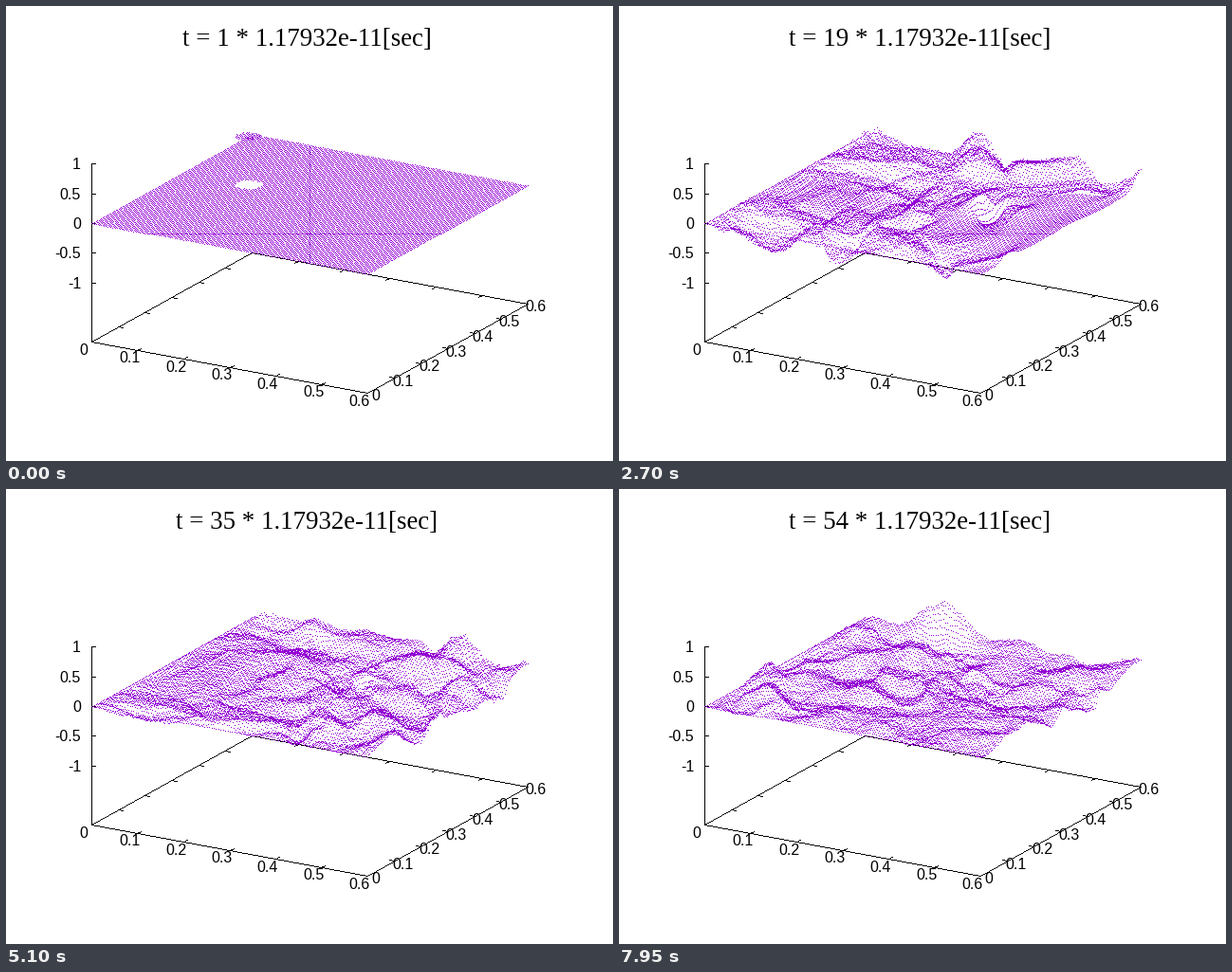
Write a matplotlib script that moves like this. It is 640 by 480 pixels and loops after 8 s.

```python
import numpy as np
import matplotlib.pyplot as plt
from matplotlib.animation import FuncAnimation

WIDTH, HEIGHT, DPI = 640, 480, 96
SNAPSHOTS, STEPS_PER_SNAPSHOT = 54, 8
CELLS = 120
COURANT_SQ = 0.499
DAMPING = 0.002
PERIOD, DRIVE_STEPS, AMPLITUDE = 36, 36, 0.81
PURPLE = (0x94 / 255, 0, 0xD3 / 255, 1)
BLACK = (0, 0, 0, 1)
PX_PER_Z = 62.5


def project(u, v, z=0.0):
    """Screen position of a point with u, v in 0..1 on the plate."""
    return 90 + 291 * u + 169 * v, 229 + 54 * u - 94 * v - PX_PER_Z * z


def floor_point(u, v):
    return project(u, v, -2)


def disc(ci, cj, radius):
    i, j = np.indices((CELLS + 1, CELLS + 1))
    return (i - ci) ** 2 + (j - cj) ** 2 <= radius ** 2


def simulate():
    """Wave equation: fixed walls at 0, free walls at the far sides,
    a short oscillating source and a slower round obstacle."""
    source = disc(28, 69, 5)
    gain = np.where(disc(72, 67, 18), COURANT_SQ / 4, COURANT_SQ)[1:, 1:]
    field = np.where(source, AMPLITUDE, 0.0)
    previous = field.copy()
    states = [field.copy()]
    for step in range(1, (SNAPSHOTS - 1) * STEPS_PER_SNAPSHOT + 1):
        p = np.pad(field, ((0, 1), (0, 1)), mode="edge")
        laplacian = (p[2:, 1:-1] + p[:-2, 1:-1] + p[1:-1, 2:]
                     + p[1:-1, :-2] - 4 * p[1:-1, 1:-1])
        following = field + (1 - DAMPING) * (field - previous)
        following[1:, 1:] += gain * laplacian
        if step < DRIVE_STEPS:
            following[source] = AMPLITUDE * np.cos(2 * np.pi * step / PERIOD)
        previous, field = field, following
        if step % STEPS_PER_SNAPSHOT == 0:
            states.append(field.copy())
    return states


def draw_line(image, start, end):
    (x0, y0), (x1, y1) = np.rint([start, end])
    count = int(max(abs(x1 - x0), abs(y1 - y0))) + 1
    cols = np.rint(np.linspace(x0, x1, count)).astype(int)
    rows = np.rint(np.linspace(y0, y1, count)).astype(int)
    image[rows, cols] = BLACK


def draw_tick(image, point, dx, dy):
    draw_line(image, point, (point[0] + dx, point[1] + dy))


def axes_image():
    image = np.ones((HEIGHT, WIDTH, 4))
    corners = [floor_point(*c) for c in ((0, 0), (1, 0), (1, 1), (0, 1), (0, 0))]
    for start, end in zip(corners, corners[1:]):
        draw_line(image, start, end)
    draw_line(image, corners[0], project(0, 0, 1))
    for f in np.arange(1, 6) / 6:
        draw_tick(image, floor_point(f, 0), 4, -2)
        draw_tick(image, floor_point(f, 1), -4, 2)
        draw_tick(image, floor_point(1, f), -5, -1)
        draw_tick(image, floor_point(0, f), 5, 1)
    for z in (-1, -0.5, 0, 0.5, 1):
        draw_tick(image, project(0, 0, z), 4, 0)
    return image


def surface_image(background, z):
    u, v = np.indices(z.shape) / CELLS
    inside = np.abs(z) <= 1
    x, y = project(u[inside], v[inside], z[inside])
    # Offsets are cut toward the stage centre, which thickens its two axes.
    col = WIDTH // 2 + np.trunc(x - WIDTH / 2).astype(int)
    row = HEIGHT // 2 + np.trunc(y - HEIGHT / 2).astype(int)
    image = background.copy()
    image[row, col] = PURPLE
    return image


fig = plt.figure(figsize=(WIDTH / DPI, HEIGHT / DPI), dpi=DPI, facecolor="white")
ax = fig.add_axes([0, 0, 1, 1])


def label(x, y, text, align="center"):
    ax.text(x, y + 6, text, size=12, family="Liberation Sans",
            ha=align, va="baseline", zorder=3)


def draw_labels():
    for k in range(7):
        text = f"{k / 10:g}"
        x, y = floor_point(k / 6, 0)
        label(x - 8, y + 7.5, text)
        x, y = floor_point(1, k / 6)
        label(x + 9, y + 2.5, text)
    for z in (-1, -0.5, 0, 0.5, 1):
        label(79, project(0, 0, z)[1], f"{z:g}", "right")


draw_labels()
background = axes_image()
states = simulate()
picture = ax.imshow(surface_image(background, states[0]),
                    extent=(0, WIDTH, HEIGHT, 0), interpolation="nearest",
                    aspect="auto", zorder=2)
title = ax.text(317.5, 42, "", size=20.2, family="Liberation Serif",
                ha="center", va="baseline", zorder=3)
ax.set_xlim(0, WIDTH)
ax.set_ylim(HEIGHT, 0)
ax.axis("off")


def update(frame):
    n = frame // 3
    picture.set_data(surface_image(background, states[n]))
    title.set_text(f"t = {n + 1} * 1.17932e-11[sec]")
    return picture, title


anim = FuncAnimation(fig, update, frames=160, interval=50, repeat=True,
                     repeat_delay=0, blit=False)
plt.show()
```
